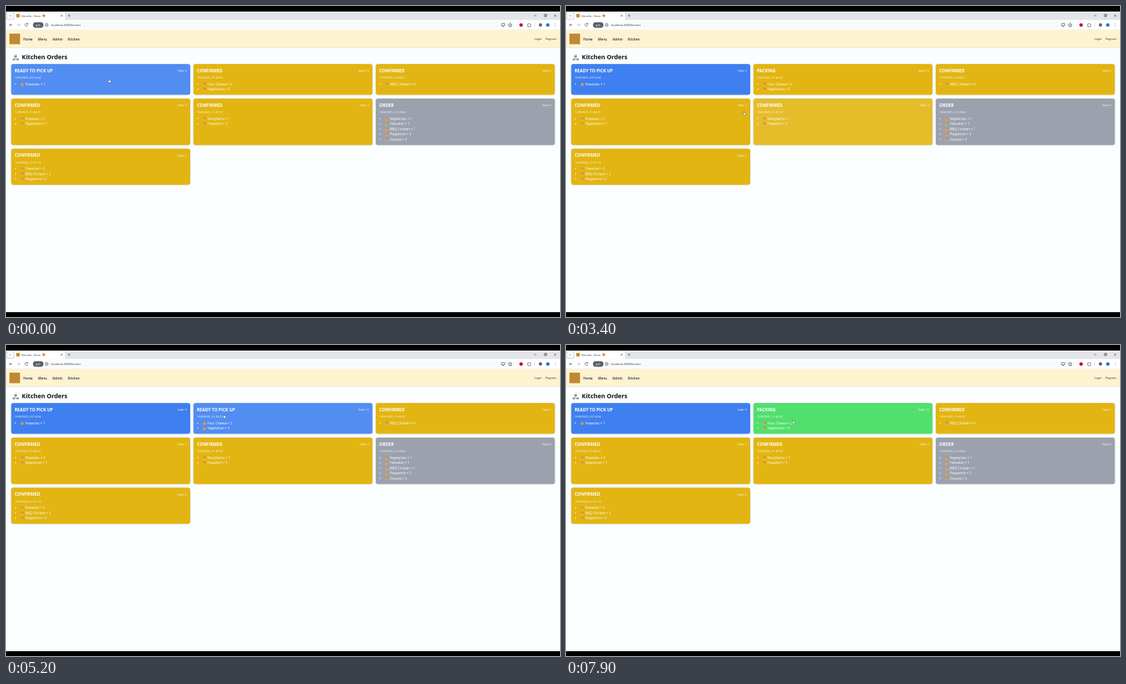
Write an HTML page that moves like this. It is 800x450 px and loops after 8000 ms.

```html
<!DOCTYPE html>
<html lang="en">
<head>
<meta charset="utf-8">
<title>Kitchen Orders</title>
<style>
  html, body { margin: 0; width: 100%; height: 100%; overflow: hidden; background: #000; }
  svg { display: block; width: 100vw; height: 100vh; }
  text { font-family: "Open Sans", "Noto Sans", sans-serif; white-space: pre; }
  .line { fill: none; stroke: #3c4043; stroke-width: .65; }
  .card text { fill: #fff; }
  .card rect { filter: drop-shadow(0 .8px .9px rgba(0, 0, 0, .16)); }
</style>
</head>
<body>
<svg viewBox="0 0 800 450">
  <defs>
    <g id="slice">
      <path d="M.3 2.2 2.6.2 5.2 2.9 4.6 4.1z" fill="#c9793a"/>
      <path d="M.6 2.5 4.6 3.9 1.4 5.4z" fill="#f6c667"/>
      <path d="M2.2.8 4.9 3.2 3.6 4 1 2.4z" fill="#f3b557"/>
      <circle cx="2.5" cy="2.4" r=".65" fill="#d6442f"/>
      <circle cx="1.8" cy="4" r=".5" fill="#d6442f"/>
      <circle cx="3.7" cy="3.2" r=".45" fill="#d6442f"/>
    </g>
  </defs>

  <!-- browser window -->
  <rect y="8" width="800" height="435" fill="#fbfefe"/>
  <rect y="8" width="800" height="12.5" fill="#e3e5e8"/>
  <rect x="2" y="10" width="8.5" height="8.2" rx="2.2" fill="#fff"/>
  <path class="line" d="M5 13.5l1.2 1.2 1.2-1.2"/>
  <path d="M10 20.5q2 0 2-2V11.5q0-2 2-2H83q2 0 2 2V18.5q0 2 2 2z" fill="#fff"/>
  <rect x="14.8" y="11.5" width="5" height="5" fill="#c08a35"/>
  <text x="22" y="15.5" font-size="3.6" fill="#333">Sfornella - Demo</text>
  <use href="#slice" x="51.8" y="11.3"/>
  <path class="line" d="M79 12.6l2.8 2.8m0-2.8l-2.8 2.8M89.5 14h3.2m-1.6-1.6v3.2M762.5 14h3.4M777.4 12.8h2.6v2.6h-2.6zM778.2 12.8v-.7h2.5v2.6h-.7M791.5 12.5l3 3m0-3l-3 3"/>
  <rect y="20.3" width="800" height="14.5" fill="#fff"/>
  <rect x="37.5" y="22.3" width="697" height="10.4" rx="5.2" fill="#f8fafc"/>
  <path class="line" d="M9.2 27.4H5m2-2-2 2 2 2"/>
  <path class="line" style="stroke:#a3a6aa" d="M16 27.4h4.2m-2-2 2 2-2 2"/>
  <path class="line" d="M31.3 26.2a2.1 2.1 0 1 0 .2 1.9M31.6 24.8v1.7h-1.7"/>
  <rect x="39" y="23.6" width="15" height="7.8" rx="3.9" fill="#5b5d60"/>
  <text x="46.5" y="29" font-size="4.2" fill="#fff" text-anchor="middle">gifs</text>
  <circle class="line" cx="58.7" cy="27.4" r="2"/>
  <path class="line" d="M58.7 27v1.5m0-2.4v.4"/>
  <text x="65" y="29" font-size="4.1" fill="#333">localhost:3000/kitchen</text>
  <path class="line" d="M715.7 25.4h4.4v3.3h-4.4zM717 29.8h2"/>
  <path class="line" d="M728 24.8l.8 1.8 1.9.2-1.4 1.3.4 1.9-1.7-1-1.7 1 .4-1.9-1.4-1.3 1.9-.2z"/>
  <circle cx="743.8" cy="27.4" r="2.5" fill="#c8102e"/>
  <path class="line" d="M753.3 26h1.4q.8-1.6 1.6 0h1.3v1.4q1.5.8 0 1.5v.9h-4.3z"/>
  <path class="line" style="stroke:#d5d9e0" d="M763.5 24.5v6"/>
  <circle cx="771.8" cy="27.4" r="2.4" fill="#59636f"/>
  <circle cx="782.4" cy="27.4" r="2.5" fill="#2f73d9"/>
  <g fill="#3c4043"><circle cx="793.2" cy="25.6" r=".45"/><circle cx="793.2" cy="27.4" r=".45"/><circle cx="793.2" cy="29.2" r=".45"/></g>

  <!-- site header -->
  <rect y="34.7" width="800" height="25.3" fill="#fdf3d0"/>
  <rect y="34.5" width="800" height=".4" fill="#dfe1e4"/>
  <rect y="60" width="800" height=".9" fill="#e9e7df"/>
  <rect x="5" y="40" width="15.3" height="15.3" fill="#c08a35"/>
  <g font-size="4.7" font-weight="600" fill="#27303d">
    <text x="25" y="49.6">Home</text><text x="46.3" y="49.6">Menu</text>
    <text x="67" y="49.6">Admin</text><text x="89.3" y="49.6">Kitchen</text>
  </g>
  <g font-size="4.3" fill="#27303d">
    <text x="762.8" y="49.4">Login</text><text x="779" y="49.4">Register</text>
  </g>

  <!-- heading with cook -->
  <g>
    <path d="M10.2 78.3q0-3.6 3.6-3.6t3.8 3.6z" fill="#e9edf2"/>
    <path d="M9.7 76.2h3.2v2.4H9.7zM15.4 76h3v2.6h-3z" fill="#4a8fd0"/>
    <circle cx="13.8" cy="73.6" r="2" fill="#e9b36c"/>
    <path d="M11.8 73q0-1.2 2-1.2t2 1.2z" fill="#7a4a2a"/>
    <path d="M11.8 72l-.4-2.1q2.4-1.7 4.8 0l-.4 2.1z" fill="#dfe5ec"/>
    <path d="M12.8 75.7h2l-1 .9z" fill="#d6442f"/>
  </g>
  <text x="22.8" y="77" font-size="8.8" font-weight="700" fill="#111">Kitchen Orders</text>

  <g id="cards"></g>
  <path id="hand" d="M-.5-2.4q.6-.5 1 0V-.5l1.6.5q.6.3.4 1L2 2.8H-.6L-2 .8q0-.8.8-.5l.7.5z" fill="#fff" stroke="#333" stroke-width=".4"/>
</svg>

<script>
const LOOP = 8000, FADE = 150;
const PAGE = [251, 254, 254];
const COLORS = {
  'ORDER': [155, 162, 174],
  'CONFIRMED': [226, 181, 18],
  'PACKING': [49, 223, 99],
  'READY TO PICK UP': [63, 128, 240]
};
const COLUMNS = [7.5, 270.7, 534];
const ROWS = [[84, 44.6], [134, 67.2], [206.5, 52.3]];

const orders = [
  ['READY TO PICK UP', 5, '20:14:34', 'Hawaiian × 1'],
  ['CONFIRMED', 15, '21:42:01', 'Four Cheese × 2', 'Vegetarian × 3'],
  ['CONFIRMED', 3, '21:44:57', 'BBQ Chicken × 4'],
  ['CONFIRMED', 3, '21:46:07', 'Hawaiian × 3', 'Vegetarian × 1'],
  ['CONFIRMED', 2, '21:47:57', 'Margherita × 1', 'Hawaiian × 3'],
  ['ORDER', 5, '21:50:46', 'Vegetarian × 1', 'Hawaiian × 1', 'BBQ Chicken × 1', 'Pepperoni × 2', 'Diavola × 3'],
  ['CONFIRMED', 5, '21:51:18', 'Hawaiian × 2', 'BBQ Chicken × 2', 'Pepperoni × 2']
];

// status changes of the second card: [time, status]
const changes = [
  [-LOOP, 'CONFIRMED'], [3400, 'PACKING'], [4890, 'READY TO PICK UP'],
  [6290, 'CONFIRMED'], [7790, 'PACKING']
];
// [card, pointer enters, pointer leaves]
const hovers = [
  [0, -LOOP, 2350], [1, 2450, 3080], [4, 3080, 3400], [3, 3400, 3550], [1, 3620, 2 * LOOP]
];
// pointer path: [time, x, y]
const path = [
  [0, 149, 108], [2000, 149, 108], [2700, 322, 106], [3000, 322, 106],
  [3300, 285, 160], [3400, 257, 155], [3800, 323, 105], [4300, 323, 105],
  [5200, 315, 103], [6200, 315, 103], [6800, 317, 105], [7200, 317, 105],
  [7600, 328, 111], [LOOP, 328, 111]
];

const clamp = v => Math.max(0, Math.min(1, v));
const ease = p => 1 - (1 - clamp(p)) ** 2;
const mix = (a, b, p) => a.map((v, i) => v + (b[i] - v) * p);

function cardMarkup([status, table, time, ...items], i) {
  const x = COLUMNS[i % 3], [y, h] = ROWS[Math.floor(i / 3)];
  const list = items.map((item, k) => {
    const base = 30.7 + 7.5 * k;
    return `<circle cx="6.2" cy="${base - 1.7}" r=".75" fill="#fff"/>
      <use href="#slice" x="13.3" y="${base - 4.4}"/>
      <text x="20.3" y="${base}" font-size="4.8">${item}</text>`;
  }).join('');
  return `<g class="card" transform="translate(${x} ${y})">
    <rect width="258.5" height="${h}" rx="3.3"/>
    <text class="status" x="5.1" y="11.7" font-size="6.1" font-weight="700">${status}</text>
    <text x="253.5" y="11" font-size="4.1" text-anchor="end">Table ${table}</text>
    <text x="5.1" y="21" font-size="4.1">16/8/2025, ${time}</text>${list}</g>`;
}

const cards = document.getElementById('cards');
const hand = document.getElementById('hand');
cards.innerHTML = orders.map(cardMarkup).join('');
const boxes = [...cards.querySelectorAll('rect')];
const label = cards.querySelectorAll('.status')[1];

function hoverAmount(card, t) {
  return hovers.filter(h => h[0] === card)
    .reduce((sum, [, on, off]) => sum + ease((t - on) / FADE) - ease((t - off) / FADE), 0);
}

function draw(t) {
  const n = changes.filter(c => c[0] <= t).length - 1;
  const [since, status] = changes[n];
  const before = changes[Math.max(0, n - 1)][1];
  label.textContent = status;

  boxes.forEach((box, i) => {
    const base = i === 1
      ? mix(COLORS[before], COLORS[status], ease((t - since) / FADE))
      : COLORS[orders[i][0]];
    box.setAttribute('fill', `rgb(${mix(base, PAGE, .1 * hoverAmount(i, t)).map(Math.round)})`);
  });

  const k = path.findIndex(p => p[0] > t);
  const a = path[k - 1], b = path[k];
  const [, x, y] = mix(a, b, (t - a[0]) / (b[0] - a[0]));
  hand.setAttribute('transform', `translate(${x} ${y})`);
}

const start = performance.now();
function tick() {
  const t = (performance.now() - start) % LOOP;
  draw(Math.floor(t / 100) * 100);
  requestAnimationFrame(tick);
}
tick();
</script>
</body>
</html>
```
